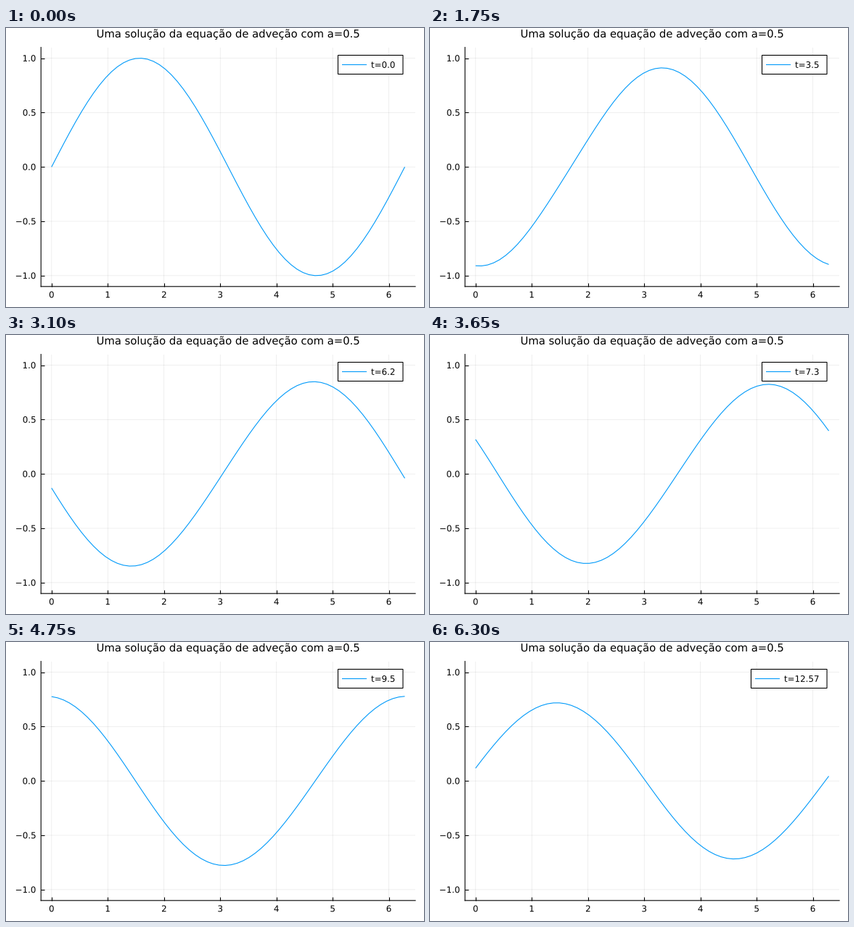
A matplotlib script that plays this animation: 576x384 px, repeating every 6350 ms.

```python
import numpy as np
import matplotlib.pyplot as plt
from matplotlib.animation import FuncAnimation
from matplotlib.patches import PathPatch, Rectangle
from matplotlib.textpath import TextPath
from matplotlib.transforms import Affine2D

W, H, DPI = 576, 384, 100
PX = 72 / DPI  # points per pixel
FRAMES, INTERVAL = 127, 50
BLUE = "#009afa"
LINE = 1.1 * PX
FONT, TITLE_FONT = 11.85, 14.8  # pixels

plt.rcParams.update({
    "font.family": "DejaVu Sans",
    "axes.linewidth": LINE,
    "lines.linewidth": LINE,
    "lines.solid_capstyle": "butt",
    "path.snap": False,
})

# Upwind advection on a periodic ring of N points, exact in time
A, N, T_END = 0.5, 60, 4 * np.pi
x = np.linspace(0, 2 * np.pi, N)
dx = x[1] - x[0]
u0_hat = np.fft.fft(np.sin(x))
rate = -A / dx * (1 - np.exp(-2j * np.pi * np.fft.fftfreq(N)))


def solution(t):
    return np.fft.ifft(u0_hat * np.exp(rate * t)).real


fig = plt.figure(figsize=(W / DPI, H / DPI), dpi=DPI, facecolor="white")

# Plot area in pixels from the top left
LEFT, TOP, RIGHT, BOTTOM = 48.2, 26.6, 564.1, 355.8
ax = fig.add_axes([LEFT / W, 1 - BOTTOM / H, (RIGHT - LEFT) / W, (BOTTOM - TOP) / H])
margin = 0.03 * 2 * np.pi
ax.set_xlim(-margin, 2 * np.pi + margin)
ax.set_ylim(-1.1, 1.1)
ax.set_xticks(range(7))
ax.set_yticks(np.arange(-1, 1.1, 0.5))
ax.spines[["top", "right"]].set_visible(False)
ax.set_axisbelow(True)
ax.grid(color="black", alpha=0.1, linewidth=0.6 * PX)
ax.tick_params(direction="in", length=5 * PX, width=LINE,
               labelbottom=False, labelleft=False)
curve, = ax.plot([], [], color=BLUE)

# Overlay in pixel coordinates for the text and legend
over = fig.add_axes([0, 0, 1, 1])
over.set_xlim(0, W)
over.set_ylim(H, 0)
over.axis("off")


def text_path(text, px, py, size=FONT, align=None):
    """Outline of text with its baseline at py; align 0.5 centres, 1 ends at px."""
    path = TextPath((0, 0), text, size=size)
    if align is not None:
        ink = path.get_extents()
        px -= ink.x0 + align * ink.width
    return Affine2D().scale(1, -1).translate(px, py).transform_path(path)


def add_text(*args, **kwargs):
    return over.add_patch(PathPatch(text_path(*args, **kwargs), color="black", linewidth=0))


def to_pixels(vx, vy):
    px = LEFT + (vx + margin) / (2 * np.pi + 2 * margin) * (RIGHT - LEFT)
    return px, TOP + (1.1 - vy) / 2.2 * (BOTTOM - TOP)


HALF_CAP = 0.3645 * FONT
add_text("Uma solução da equação de adveção com a=0.5",
         (LEFT + RIGHT) / 2, 13, size=TITLE_FONT, align=0.5)
for v in ax.get_xticks():
    add_text(f"{v:.0f}", to_pixels(v, 0)[0], 371.2, align=0.5)
for v in ax.get_yticks():
    add_text(f"{v:.1f}".replace("-", "\u2212"), 40.6, to_pixels(0, v)[1] + HALF_CAP, align=1)

BOX_RIGHT, BOX_TOP, BOX_H = 547, 37.5, 26
KEY_Y = BOX_TOP + BOX_H / 2
DIGIT_W = 0.636 * FONT
box = over.add_patch(Rectangle((0, BOX_TOP), 0, BOX_H, facecolor="white",
                               edgecolor="black", linewidth=LINE))
key, = over.plot([], [], color=BLUE)
label = add_text("t", 0, 0)


def update(i):
    t = min(0.1 * i, T_END)
    curve.set_data(x, solution(t))
    text = f"t={round(t, 2)}"
    start = 503 - DIGIT_W * (len(text) - 5)
    label.set_path(text_path(text, start, KEY_Y + HALF_CAP))
    label.set_zorder(3)
    key.set_data([start - 40, start - 6], [KEY_Y, KEY_Y])
    box.set_x(start - 45.5)
    box.set_width(BOX_RIGHT - start + 45.5)
    return curve, label, key, box


anim = FuncAnimation(fig, update, frames=FRAMES, interval=INTERVAL,
                     init_func=lambda: update(0), repeat=True, repeat_delay=0)
plt.show()
```
